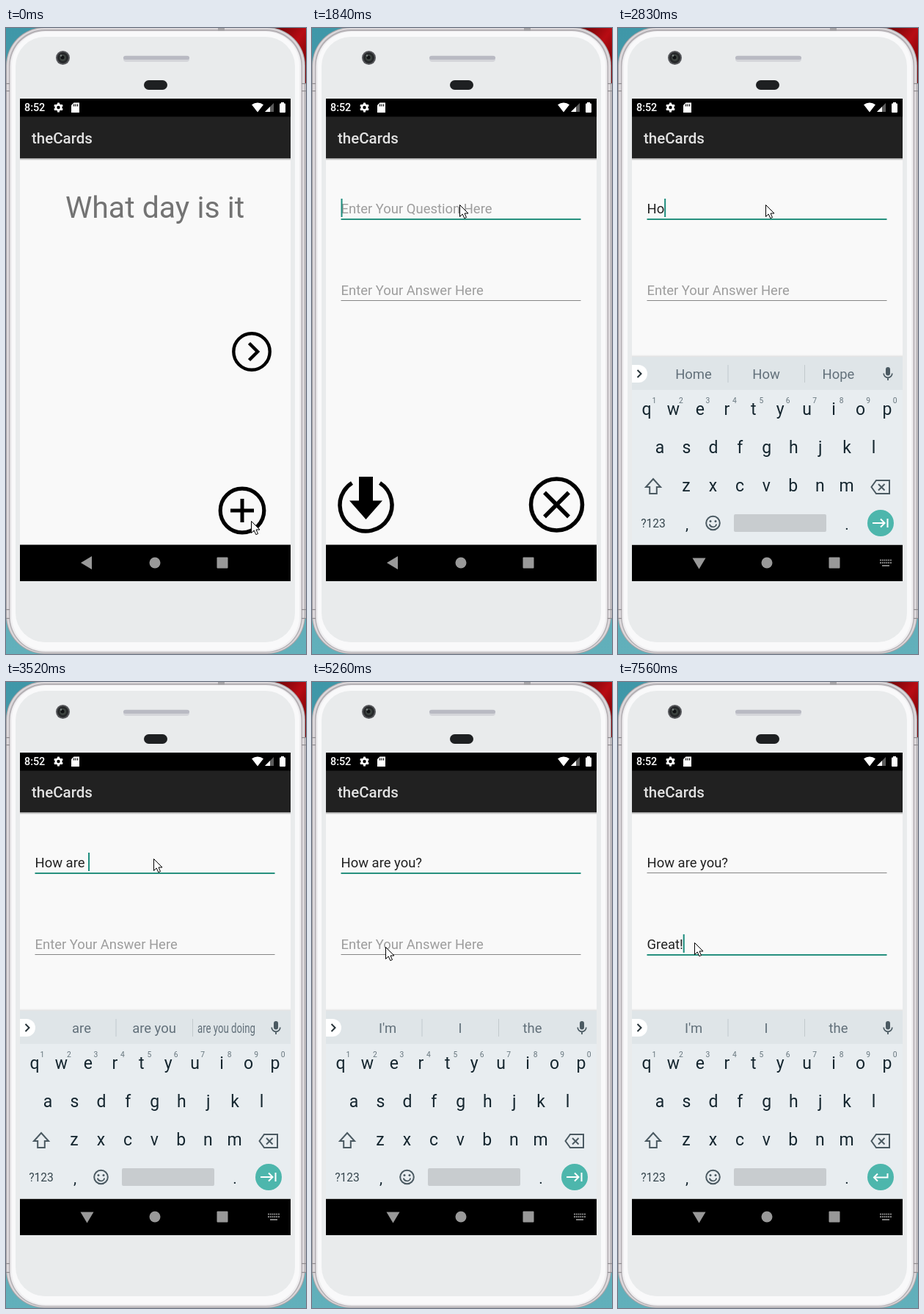
An HTML page with a canvas that plays this animation: 409 px wide and 851 px high, repeating every 7.99 s.

```html
<!DOCTYPE html>
<html lang="en">
<head>
<meta charset="utf-8">
<title>Flash card app</title>
<style>
  html, body { margin: 0; width: 100%; height: 100%; overflow: hidden; background: #4a9fae; }
  canvas { display: block; width: 409px; height: 851px; }
</style>
</head>
<body>
<canvas id="stage"></canvas>
<script>
const W = 409, H = 851, LOOP = 7990;
const canvas = document.getElementById('stage');
const c = canvas.getContext('2d');
const dpr = window.devicePixelRatio || 1;
canvas.width = W * dpr;
canvas.height = H * dpr;

const TEAL = '#1c8c7d', KEY = '#15262f', ICON = '#4b5a62';

// ---- timeline ----
const steps = (from, to, n) =>
  Array.from({ length: n }, (_, i) => from + (to - from) * i / (n - 1));
const question = {
  text: 'How are you?',
  times: [...steps(2560, 3520, 8), ...steps(3670, 3950, 3), 4420]
};
const answer = { text: 'Great!', times: [...steps(6250, 6700, 4), 7000, 7560] };
const typed = (field, t) => field.times.filter(s => s <= t + 0.01).length;

const IDLE = "I'm|I|the";
const questionHints = [IDLE, 'He|Hey|How', 'Home|How|Hope', 'Howl|How|However',
  'are|is|do', 'a|are|and', 'art|are|area', 'area|are|aren\'t',
  'are|are you|are you doing', 'yes|you|your', 'york|you|your', 'your|you|you\'re', IDLE];
const answerHints = [IDLE, 'Go|Good|Great', 'Grow|Great|Green', 'Green|Great|Greet',
  'Greater|Great|Greatly', 'Greater|Great|Greatest', IDLE];

// time, x, y of the pointer tip
const pointer = [
  [0, 334, 670], [840, 312, 580], [970, 254, 383], [1120, 210, 212], [1260, 205, 200],
  [1400, 202, 225], [1550, 201, 240], [4840, 192, 254], [4980, 162, 292],
  [5120, 118, 342], [5260, 100, 360], [5400, 103, 356], [5540, 104, 354]
];
// time, new screen offset, old screen offset, reveal edge, dimming
const opening = [[840, 26, -0.5, 360, 0.04], [970, 12, -7.5, 170, 0.18], [1120, 1.5, -12, 98, 0.2]];
const current = (rows, t) => rows.filter(r => r[0] <= t).pop();

// ---- drawing helpers ----
function rect(x, y, w, h, fill) {
  c.fillStyle = fill;
  c.fillRect(x, y, w, h);
}
function round(x, y, w, h, r, fill) {
  c.beginPath();
  c.roundRect(x, y, w, h, r);
  c.fillStyle = fill;
  c.fill();
}
function trace(pts, closed) {
  c.beginPath();
  for (let i = 0; i < pts.length; i += 2) c.lineTo(pts[i], pts[i + 1]);
  if (closed) c.closePath();
}
function poly(fill, ...pts) {
  trace(pts, true);
  c.fillStyle = fill;
  c.fill();
}
function stroke(color, width, closed, ...pts) {
  trace(pts, closed);
  c.strokeStyle = color;
  c.lineWidth = width;
  c.stroke();
}
function disc(x, y, r, fill) {
  c.beginPath();
  c.arc(x, y, r, 0, Math.PI * 2);
  c.fillStyle = fill;
  c.fill();
}
function ring(x, y, r, width, color, from = 0, to = Math.PI * 2) {
  c.beginPath();
  c.arc(x, y, r, from, to);
  c.strokeStyle = color;
  c.lineWidth = width;
  c.stroke();
}
function text(str, x, y, size, color, align = 'left', weight = 400, max) {
  c.font = `${weight} ${size}px Roboto, sans-serif`;
  c.textAlign = align;
  c.fillStyle = color;
  if (max) c.fillText(str, x, y, max);
  else c.fillText(str, x, y);
}
function gradient(x0, y0, x1, y1, ...colors) {
  const g = c.createLinearGradient(x0, y0, x1, y1);
  colors.forEach((col, i) => g.addColorStop(i / (colors.length - 1), col));
  return g;
}

// ---- phone ----
function drawPhone() {
  rect(0, 0, W, H, gradient(0, 0, 0, H, '#3f97a8', '#62b0bb'));
  rect(335, 0, 74, 90, gradient(345, 0, 409, 45, '#2c0405', '#7d0509', '#b80c13', '#800508'));

  rect(0, 76, W, 727, '#c9c4c7');
  round(0, -1, 408, 852, 52, '#a5a2a5');
  round(1, 0, 406, 850, 51, '#dcd8db');
  round(4, 2, 400, 847, 49, '#b4b0b4');
  round(5.5, 4, 397, 844, 48, '#efeef0');
  round(8, 5, 392, 841, 46, '#f9f9fa');
  round(13, 12, 381, 823, 40, '#e9ebec');
  for (const y of [75, 85, 790, 802]) {
    rect(0, y, 5, 1.2, '#8f8c90');
    rect(403, y, 6, 1.2, '#8f8c90');
  }
  rect(289, 0, 9, 4, '#a5a3a6');

  disc(77.5, 40.5, 9.5, '#55565a');
  disc(77.5, 40.5, 7.5, '#26282a');
  disc(77.5, 40.5, 4.5, '#3d4440');
  disc(77, 40, 2.5, '#101214');
  disc(75, 37.5, 1.3, '#7d8583');
  round(160, 37.5, 90, 8.5, 4, '#d4d5da');
  round(160, 38, 90, 5, 2.5, '#b9bac3');
  round(188, 71, 32, 13, 6.5, '#1e2022');
}

function drawStatus() {
  text('8:52', 25, 113, 14.35, '#fff', 'left', 500);
  ring(71.5, 108, 3.6, 2.8, '#fff');
  for (let i = 0; i < 6; i++) {
    const a = i * Math.PI / 3 + Math.PI / 6;
    ring(71.5, 108, 5.4, 2.2, '#fff', a - 0.26, a + 0.26);
  }
  poly('#fff', 92.5, 101.5, 100, 101.5, 100, 115, 89, 115, 89, 105);
  for (const x of [92, 94.5, 97]) rect(x, 103.5, 1.2, 3, '#000');

  c.beginPath();
  c.moveTo(343, 114.5);
  c.arc(343, 114.5, 13, -Math.PI * 0.71, -Math.PI * 0.29);
  c.fillStyle = '#fff';
  c.fill();
  poly('#5c5c5c', 353, 114, 365, 114, 365, 102);
  poly('#fff', 353, 114, 360, 114, 360, 107);
  rect(375, 101, 4, 2, '#fff');
  round(373, 102.5, 8, 12.5, 1, '#fff');
}

function drawNav(turn) {
  const grey = '#999';
  c.save();
  c.translate(110.5, 727);
  c.rotate(-turn * Math.PI / 2);
  poly(grey, -8.5, 0, 6.5, -9, 6.5, 9);
  c.restore();
  disc(203, 727, 7.5, grey);
  round(287.5, 719.5, 15, 15, 1, grey);
  if (turn < 1) return;
  for (let i = 0; i < 6; i++) {
    for (const y of [722.5, 726]) rect(357 + i * 2.8, y, 1.9, 2, '#8a8a8a');
  }
  rect(360, 730, 10, 1.8, '#8a8a8a');
}

// ---- app screens ----
function drawWindow() {
  rect(19, 60, 369, 720, '#000');
  rect(19, 177, 369, 525.5, '#f9f9f9');
  rect(19, 177, 369, 3, gradient(0, 177, 0, 180, 'rgba(0,0,0,.4)', 'rgba(0,0,0,0)'));
  rect(19, 120.5, 369, 56.5, '#212121');
  text('theCards', 35, 157, 20.5, '#e2e2e2', 'left', 500);
}

function drawHome() {
  drawWindow();
  text('What day is it', 203, 258, 41, '#737373', 'center');
  ring(335, 440, 24.7, 4.4, '#000');
  stroke('#000', 4.5, false, 331.5, 428.5, 343, 440, 331.5, 451.5);
  ring(322, 656, 29.8, 5.2, '#000');
  rect(306, 653.5, 32, 5, '#000');
  rect(319.5, 640, 5, 32, '#000');
}

function drawField(value, hint, y, focused, caret) {
  text(value || hint, 39.5, y + 7, 18.45, value ? '#212121' : '#9d9d9d');
  if (focused) rect(39.5, y + 14, 327, 2, '#27917f');
  else rect(39.5, y + 14, 327, 1, '#858585');
  if (caret) rect(39.5 + (value ? c.measureText(value).width : 0), y - 13, 2, 25, TEAL);
}

function drawForm(t) {
  drawWindow();
  const onAnswer = t >= 5540;
  const onQuestion = t >= 1690 && !onAnswer;
  const blinkOff = t >= 5120 && t < 5540;
  drawField(question.text.slice(0, typed(question, t)), 'Enter Your Question Here',
    245, onQuestion, onQuestion && !blinkOff);
  drawField(answer.text.slice(0, typed(answer, t)), 'Enter Your Answer Here',
    356, onAnswer, onAnswer);

  ring(73.5, 648.5, 35.5, 5.5, '#000', -Math.PI * 0.32, Math.PI * 1.32);
  poly('#000', 64, 610, 83, 610, 83, 642.5, 96, 642.5, 73.5, 668, 51, 642.5, 64, 642.5);
  ring(333.5, 648, 35, 5.5, '#000');
  stroke('#000', 5.5, false, 317, 631.5, 350, 664.5);
  stroke('#000', 5.5, false, 350, 631.5, 317, 664.5);
}

// ---- keyboard ----
function drawSuggestions(t) {
  const words = t < 5540 ? questionHints[typed(question, t)] : answerHints[typed(answer, t)];
  rect(19, 447, 369, 45, '#dfe5e8');
  round(19, 458, 21, 24, [0, 12, 12, 0], '#fff');
  stroke('#263238', 2, false, 26.5, 465, 31.5, 470, 26.5, 475);
  rect(149.5, 458, 1, 24, '#c2cacd');
  rect(254, 458, 1, 24, '#c2cacd');
  words.split('|').forEach((w, i) =>
    text(w, [103, 202, 300.5][i], 477, 18.45, '#62707a', 'center', 400, 79));
  round(365, 461, 6, 11.5, 3, ICON);
  ring(368, 469.5, 5.8, 1.7, ICON, 0, Math.PI);
  rect(367.1, 475, 1.8, 4, ICON);
}

function drawKeys(caps, enter) {
  const rows = [['qwertyuiop', 39, 526], ['asdfghjkl', 57, 578], ['zxcvbnm', 93, 630]];
  for (const [keys, x, y] of rows) {
    [...(caps ? keys.toUpperCase() : keys)].forEach((k, i) =>
      text(k, x + i * 36.45, y, 23, KEY, 'center'));
  }
  [...'1234567890'].forEach((n, i) =>
    text(n, 49.5 + i * 36.45, 510, 10.3, '#66757d', 'center'));

  stroke(ICON, 2, true, 48, 613, 58, 624, 52.8, 624, 52.8, 633, 43.2, 633, 43.2, 624, 38, 624);
  stroke(ICON, 2, true, 352, 615, 370, 615, 370, 633, 352, 633, 345.5, 624);
  stroke(ICON, 2, false, 355, 620, 363.5, 628.5);
  stroke(ICON, 2, false, 363.5, 620, 355, 628.5);

  text('?123', 48, 679, 15.6, '#37474f', 'center');
  text(',', 94, 682, 21, KEY, 'center');
  text('.', 312, 682, 21, KEY, 'center');
  ring(129.5, 673, 9.3, 2, ICON);
  disc(126, 670.5, 1.5, ICON);
  disc(133, 670.5, 1.5, ICON);
  ring(129.5, 673.5, 4.8, 1.8, ICON, 0.2, Math.PI - 0.2);
  round(158, 661, 126, 24, 2, '#c8cccf');

  disc(358, 673, 18, '#4db6ac');
  if (enter) {
    stroke('#fff', 2, false, 367.5, 668, 367.5, 673.5, 349, 673.5);
    stroke('#fff', 2, false, 354, 668.5, 349, 673.5, 354, 678.5);
  } else {
    stroke('#fff', 2, false, 347, 673, 363, 673);
    stroke('#fff', 2, false, 358, 667.5, 363.5, 673, 358, 678.5);
    stroke('#fff', 2, false, 367.5, 667, 367.5, 679);
  }
}

function drawKeyboard(t) {
  const entering = t < 2290;
  c.save();
  c.beginPath();
  c.rect(19, 440, 369, 262.5);
  c.clip();
  c.globalAlpha = entering ? 0.6 : t < 2560 ? 0.97 : 1;
  c.translate(0, entering ? 14 : t < 2560 ? 0.5 : 0);
  rect(19, 444, 369, 3, gradient(0, 444, 0, 447, 'rgba(0,0,0,0)', 'rgba(0,0,0,.1)'));
  rect(19, 447, 369, 256, '#e8edf0');
  drawSuggestions(t);
  drawKeys(t >= 7430 && t < 7560, t >= 5540);
  c.restore();
}

function drawPointer(t) {
  const [, x, y] = current(pointer, t);
  c.save();
  c.translate(x + 0.5, y + 0.5);
  trace([0, 0, 0, 16, 3.7, 12.5, 6.3, 18.2, 9, 17, 6.5, 11.5, 11.5, 11.5], true);
  c.fillStyle = '#fff';
  c.fill();
  c.strokeStyle = '#000';
  c.lineWidth = 1;
  c.stroke();
  c.restore();
}

function drawScreen(t) {
  c.save();
  c.beginPath();
  c.rect(19, 96, 369, 656);
  c.clip();
  if (t < 840) {
    drawHome();
  } else if (t < 1260) {
    const [, rise, lift, edge, dim] = current(opening, t);
    c.save();
    c.translate(0, lift);
    drawHome();
    c.restore();
    rect(19, 96, 369, 656, `rgba(0,0,0,${dim})`);
    c.beginPath();
    c.rect(19, edge, 369, 752 - edge);
    c.clip();
    c.translate(0, rise);
    drawForm(t);
  } else {
    drawForm(t);
    if (t >= 2140) drawKeyboard(t);
  }
  c.restore();
  drawStatus();
  drawNav(t < 2140 ? 0 : t < 2290 ? 0.5 : 1);
}

function render(now) {
  const t = now % LOOP;
  c.setTransform(dpr, 0, 0, dpr, 0, 0);
  drawPhone();
  drawScreen(t);
  drawPointer(t);
}

let start;
function tick(now) {
  start ??= now;
  render(now - start);
  requestAnimationFrame(tick);
}
render(0);
requestAnimationFrame(tick);
</script>
</body>
</html>
```
